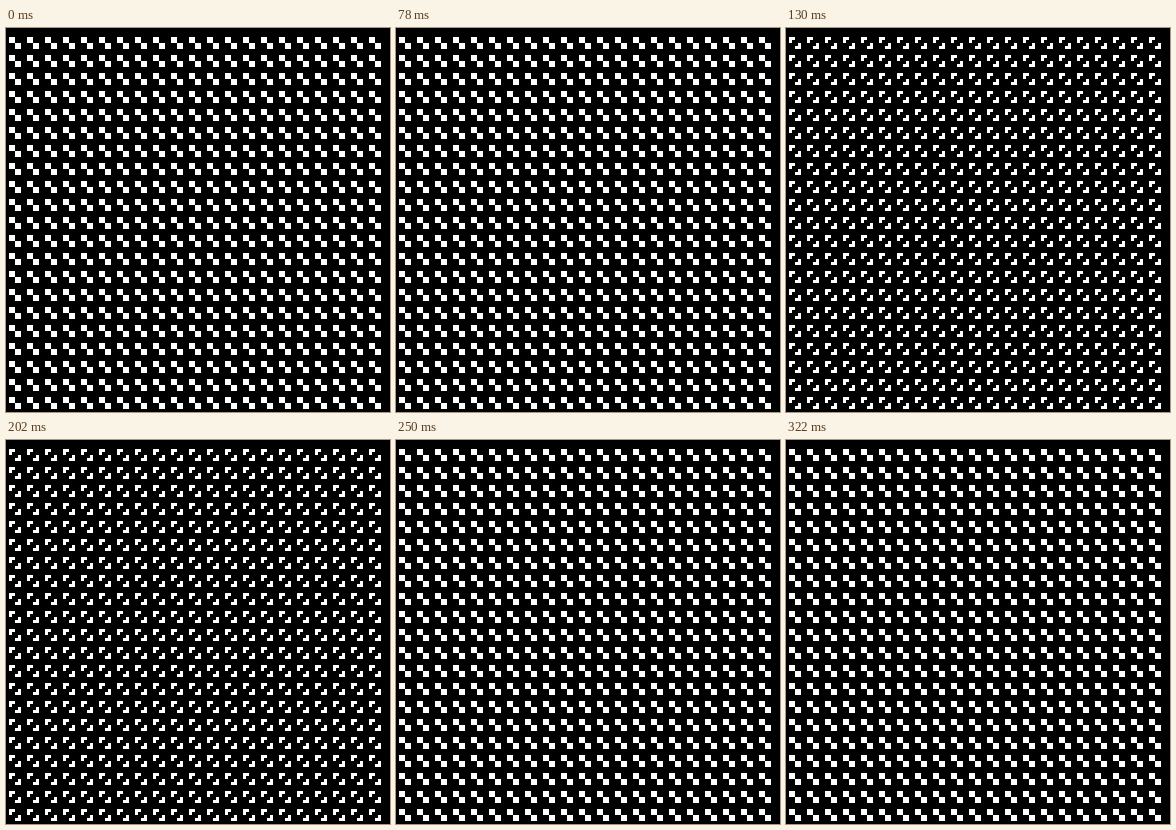
Recreate the animation shown at these times as an HTML page with a canvas. Size 384x384 px, loop 0.37 s.

```html
<!DOCTYPE html>
<html lang="en">
<head>
<meta charset="utf-8">
<title>Blinking beacons</title>
<style>
html, body { margin: 0; width: 100%; height: 100%; overflow: hidden; background: #000; }
canvas { display: block; }
</style>
</head>
<body>
<canvas width="384" height="384"></canvas>
<script>
const ctx = document.querySelector('canvas').getContext('2d');
const CELL = 3, PITCH = 18, COUNT = 21, LEFT = 3, TOP = 9;
const LOOP = 370, OPEN_FROM = 130, OPEN_TO = 250;

function square(x, y, cells, color) {
  ctx.fillStyle = color;
  ctx.fillRect(x, y, cells * CELL, cells * CELL);
}

// Two diagonal blocks; when open, their touching inner cells are dead.
function beacon(x, y, open) {
  const mid = 2 * CELL;
  square(x, y, 2, '#fff');
  square(x + mid, y + mid, 2, '#fff');
  if (open) square(x + CELL, y + CELL, 2, '#000');
}

function draw(t) {
  const open = t >= OPEN_FROM && t < OPEN_TO;
  ctx.fillStyle = '#000';
  ctx.fillRect(0, 0, 384, 384);
  for (let row = 0; row < COUNT; row++)
    for (let col = 0; col < COUNT; col++)
      beacon(LEFT + col * PITCH, TOP + row * PITCH, open);
}

const start = performance.now();
function tick() {
  draw((performance.now() - start) % LOOP);
  requestAnimationFrame(tick);
}
tick();
</script>
</body>
</html>
```
